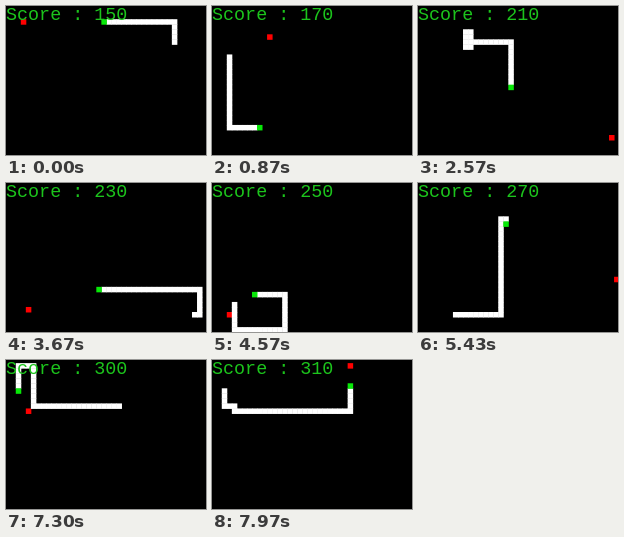
Recreate the animation shown at these times as an HTML page with a canvas. Size 200x149 px, loop 8 s.

```html
<!DOCTYPE html>
<html lang="en">
<head>
<meta charset="utf-8">
<title>Snake</title>
<style>
  html, body { margin: 0; width: 100%; height: 100%; overflow: hidden; background: #000; }
  canvas { display: block; width: 200px; height: 149px; }
</style>
</head>
<body>
<canvas id="stage" width="200" height="149"></canvas>
<script>
const ctx = document.getElementById('stage').getContext('2d');

const LOOP = 8000, FPS = 30, MOVES_PER_SECOND = 49.9;
const START_SCORE = 150;
const START_MOVE = 18;
const PITCH = 5.035, SIZE = 5.5; // cells overlap slightly
const ORIGIN = { x: -0.3, y: -1.9 };

// Steering from the tail's first cell: direction and number of cells.
const route = 'U4 L30 D21 R8 U18 L3 D12 R9 U10 L8 U3 R1 D2 R8 D19 R20 U5 L34 ' +
  'D8 R10 U7 L11 D4 R13 U19 R1 D12 R22 U10 L34 U8 L3 D8 R2 D1 R23 U5';
const foods = [[3, 3], [8, 24], [11, 6], [8, 18], [16, 8], [9, 5], [38, 26], [28, 21],
  [4, 25], [14, 29], [3, 26], [16, 7], [39, 19], [23, 9], [5, 1], [4, 10], [27, 1]];

const headings = { U: [0, -1], D: [0, 1], L: [-1, 0], R: [1, 0] };
const path = [[33, 7]];
for (const leg of route.split(' ')) {
  const [dx, dy] = headings[leg[0]];
  for (let n = +leg.slice(1); n > 0; n--) {
    const [x, y] = path[path.length - 1];
    path.push([x + dx, y + dy]);
  }
}

// Move at which each food is reached, in order.
let reached = START_MOVE;
const meals = foods.slice(0, -1).map(([fx, fy]) =>
  reached = path.findIndex(([x, y], i) => i > reached && x === fx && y === fy));

function cell([col, row], color) {
  ctx.fillStyle = color;
  ctx.fillRect(ORIGIN.x + col * PITCH, ORIGIN.y + row * PITCH, SIZE, SIZE);
}

function draw(time) {
  const frame = Math.floor((time % LOOP + 5) * FPS / 1000);
  const move = START_MOVE + Math.floor(frame / FPS * MOVES_PER_SECOND + 0.6);
  const head = Math.min(move, path.length - 1);
  const eaten = meals.filter(m => m <= head).length;
  const score = START_SCORE + eaten * 10;
  const length = score / 10 + 4;

  ctx.fillStyle = '#000';
  ctx.fillRect(0, 0, 200, 149);
  cell(foods[eaten], '#f00');
  for (let i = Math.max(0, head - length + 1); i < head; i++) cell(path[i], '#fff');
  cell(path[head], '#08e808');

  ctx.font = '18.4px "Liberation Mono", "Courier New", monospace';
  ctx.fillStyle = '#1cc41c';
  ctx.fillText('Score : ' + score, 0, 14);
}

const began = performance.now();
function tick() {
  draw(performance.now() - began);
  requestAnimationFrame(tick);
}
tick();
</script>
</body>
</html>
```
